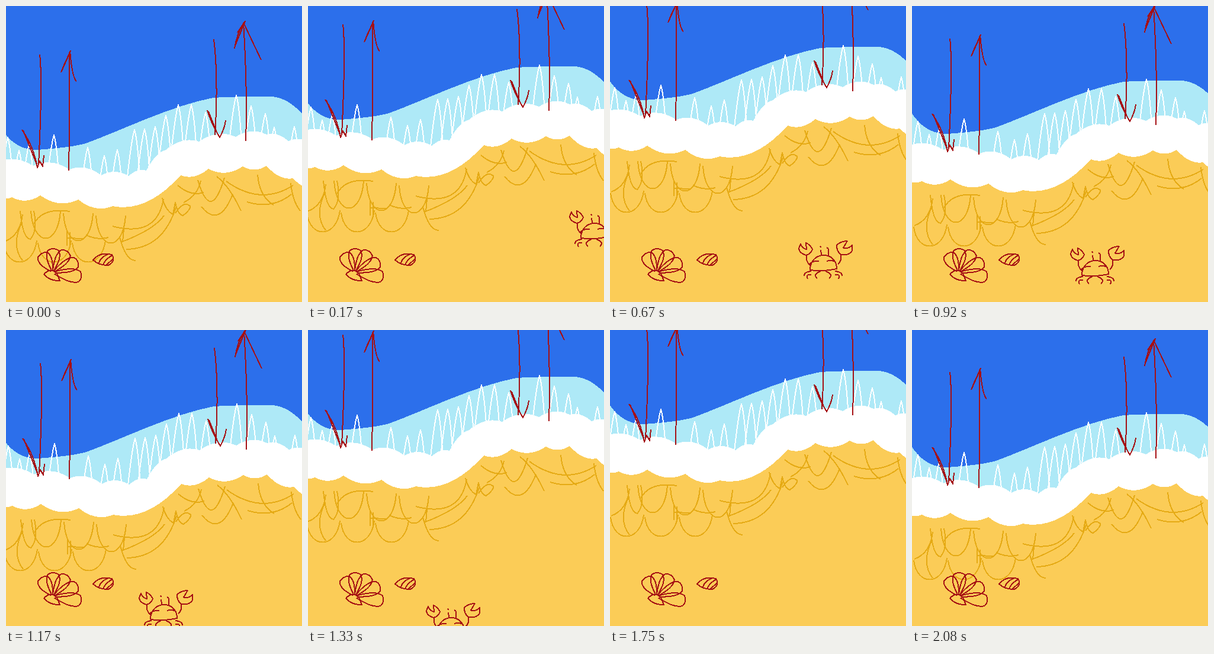
These frames come from a looping animation (500x500 px, 2120 ms). An HTML page:

```html
<!DOCTYPE html>
<html lang="en">
<head>
<meta charset="utf-8">
<title>Beach waves</title>
<style>
  html, body { margin: 0; width: 100%; height: 100%; overflow: hidden; background: #2c6feb; }
  svg { display: block; width: 100vw; height: 100vh; shape-rendering: crispEdges; }
  path { fill: none; stroke-width: 2; stroke-linejoin: round; vector-effect: non-scaling-stroke; }
  .area { stroke: none; }
  #water { fill: #aee9f7; }
  #foam { fill: #fff; }
  #sand { fill: #fbcc57; }
  #spikes { stroke: #fff; }
  .ripples { stroke: #e5aa14; }
  .red { stroke: #a51014; }
</style>
</head>
<body>
<svg viewBox="0 0 500 500">
  <defs>
    <path id="claw" d="M0,0Q-12,-4 -12,-12L-9,-19Q-6,-11 1,-10L0,-21Q7,-18 11,-10Q8,-2 0,0"/>
    <path id="legs" d="M-20,2Q-32,3 -32,10M-20,8Q-30,6 -26,15M-4,2Q-18,7 -10,14"/>
  </defs>
  <g id="wave">
    <path id="water" class="area" d="M-20,189C-6,210 10,243 52,243Q110,239 135,232C195,210 280,168 350,155Q380,153 450,153Q477,156 500,182L520,204V700H-20Z"/>
    <path id="spikes"/>
    <path id="foam" class="area"/>
    <path id="sand" class="area"/>
    <g class="ripples">
      <path id="cups"/>
      <path d="M24,346Q28,392 41,394Q54,380 47,346M28,352Q24,388 -3,398M27,365Q8,405 28,430M47,368Q62,340 108,347"/>
      <path d="M103,380V405M108,382V408M103,392L130,393M135,387Q155,396 173,391"/>
      <path d="M180,372Q255,392 266,326M194,399Q250,378 267,354M203,411Q265,410 287,340M192,390Q202,430 219,430M200,366L197,398"/>
      <path d="M264,324Q270,346 282,352L286,332Q290,352 299,354Q312,344 311,338Q300,328 286,350"/>
      <path d="M290,303Q312,322 334,315M300,332Q324,320 329,295M324,294Q346,368 369,290M330,339Q360,376 383,318M356,288Q378,305 397,346"/>
      <path d="M372,296Q430,338 485,303M407,331Q450,344 482,318M481,299Q484,330 497,346M425,285Q428,322 452,336"/>
    </g>
    <g class="red">
      <path d="M57,82Q62,125 55,268M27,209Q47,238 53,273L57,262L62,271L64,252M29,210L52,268"/>
      <path d="M106,278Q108,170 107,78M93,112L109,76L97,102L93,112M108,76Q112,122 119,127"/>
      <path d="M351,56Q359,120 353,218M340,176Q345,195 361,222Q370,205 371,193M342,178L356,213L343,184"/>
      <path d="M405,228Q408,140 401,28M386,72Q390,44 404,26L387,67L402,30L431,91M391,45L403,27"/>
    </g>
  </g>
  <g class="red">
    <g id="shell"></g>
    <path d="M64,453Q76,441 86,452L91,464Q74,465 64,453"/>
    <path d="M147,429Q158,415 179,420Q186,431 173,438Q156,438 147,429M157,434Q160,424 173,419M164,437Q168,427 180,421M169,438L181,427"/>
  </g>
  <g id="crab" class="red">
    <path d="M396,419C396,386 441,386 441,417Q418,422 396,419M394,410Q400,403 411,404M424,404Q433,401 440,406"/>
    <path d="M415,393L414,385M413,379L415,381M427,394V383M424,381L427,383M396,411Q388,404 390,394M443,409Q450,403 448,393"/>
    <use href="#claw" transform="translate(389 394)"/>
    <use href="#claw" transform="translate(448 393) rotate(25) scale(-1.2 1.2)"/>
    <use href="#legs" transform="translate(418 419)"/>
    <use href="#legs" transform="translate(418 419) scale(-1 1)"/>
  </g>
</svg>
<script>
const LOOP = 2120, CYCLE = 13, FRAMES = 26;
const $ = id => document.getElementById(id);
const setPath = (id, d) => $(id).setAttribute('d', d);
const points = text => text.split(' ').map(s => s.split(',').map(Number));

// Row of arcs between cusps; longer arcs swell more
function scallops(text, swell) {
  const p = points(text);
  return p.slice(1).reduce((d, [x, y], i) => {
    const [px, py] = p[i];
    const bulge = 2 * swell * Math.hypot(x - px, y - py);
    return d + `Q${(x + px) / 2},${(y + py) / 2 + bulge} ${x},${y}`;
  }, 'M' + p[0]) + 'V700H-20Z';
}
setPath('foam', scallops('-20,266 46,270 107,276 161,286 207,287 237,278 270,243 326,229 388,221 440,217 477,228 520,234', -.14));
setPath('sand', scallops('-20,318 10,323 58,320 122,327 180,338 295,286 342,275 400,271 440,270 485,291 520,307', .15));

// Every spike has one shape; the foam hides its feet
const tips = '3,222 22,244 39,234 81,218 138,239 166,253 188,243 217,209 234,208 252,204 270,185 291,167 313,167 337,180 389,151 414,169 438,182 453,205 487,204';
setPath('spikes', points(tips).map(([x, y]) =>
  `M${x - 12},${y + 80}Q${x - 5},${y + 16} ${x},${y}Q${x + 5},${y + 16} ${x + 9},${y + 80}`).join(''));

// Two staggered rows of sand ripples
let cups = '';
for (let i = 0; i < 3; i++) {
  cups += `M${42 + 55 * i},${346 + 4 * i}c4,62 46,62 50,0`;
  cups += `M${58 * i - 4},400c5,44 50,44 56,-4`;
}
setPath('cups', cups);

// Fan of petals
for (let i = 0; i < 5; i++) {
  const n = 37 + 3 * i;
  $('shell').innerHTML += `<path transform="translate(79 450) rotate(${32.5 * i - 121})"
    d="M3,-2C${n * .4},-9 ${n * .7},-14 ${n * .93},-9Q${n * 1.07},0 ${n * .93},9C${n * .7},14 ${n * .4},9 3,2"/>`;
}

// The wave draws back with a slowing pull, then rolls in
function waveAt(k) {
  const n = k % CYCLE, u = 12 - n;
  const lift = n < 6 ? 27.1 * n - .83 * n * n : 11 + 15.25 * u + .75 * u * u;
  return [n < 6 ? lift * .03 : 4.2 + .026 * (130 - lift), -lift];
}

// The crab slows sideways while it goes down, with a short pause in its descent
function crabAt(k) {
  const j = k - 5;
  const y = k < 8 ? 9 * j : k < 11 ? 3 * k + 3 : 11.2 * (k - 11) + 36;
  return [.405 * j * j - 20.55 * j, y];
}

// Twelve steps a second, timed in hundredths
const startOf = k => Math.round(k * 25 / 3) * 10;
const place = (id, p) => $(id).setAttribute('transform', `translate(${p.map(Math.round)})`);

function draw() {
  const t = performance.now() % LOOP;
  let k = 0;
  while (k < FRAMES - 1 && startOf(k + 1) <= t) k++;
  place('wave', waveAt(k));
  place('crab', crabAt(k));
  $('crab').style.display = k ? '' : 'none';
  requestAnimationFrame(draw);
}
draw();
</script>
</body>
</html>
```
